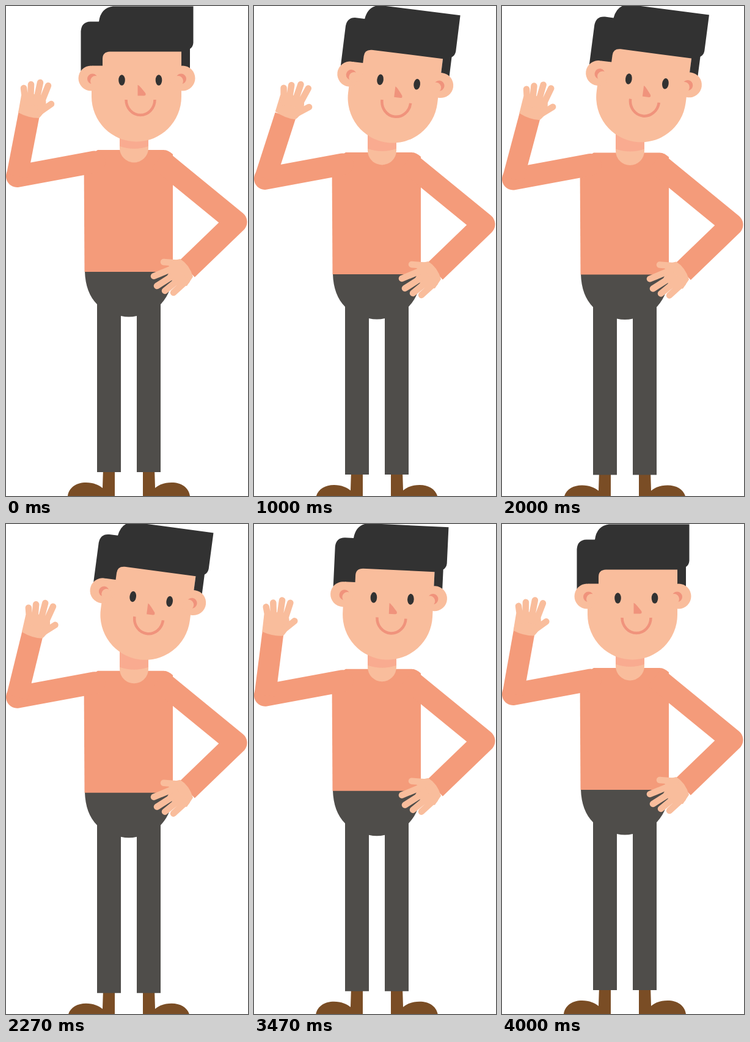
Write an HTML page that moves like this. It is 396 px wide and 800 px high and loops after 4.07 s.

```html
<!DOCTYPE html>
<html lang="en">
<head>
<meta charset="utf-8">
<title>Waving man</title>
<style>
html, body { margin: 0; width: 100%; height: 100%; overflow: hidden; background: #fff; }
svg { display: block; width: 100vw; height: 100vh; }
.skin { fill: #f9bd9c; }
.fingers { fill: none; stroke: #f9bd9c; stroke-width: 10.5; stroke-linecap: round; }
.shirt { fill: #f49b7a; }
.sleeve { fill: none; stroke: #f49b7a; stroke-width: 37; stroke-linejoin: round; }
.pants { fill: #4f4d4a; }
.shoe { fill: #7a4d25; }
.dark { fill: #323232; }
.blush { fill: #f0937c; }
</style>
</head>
<body>
<svg viewBox="0 0 396 800">
  <defs>
    <path id="shoe" class="shoe" d="M101 800C103 786 115 778 131 778C143 778 152 782 158 787L159 755H178V806H100Z"/>
    <g id="ear">
      <circle class="skin" cx="139" cy="118" r="20.5"/>
      <circle class="blush" cx="141.5" cy="119" r="8.5"/>
      <circle class="skin" cx="146.5" cy="122.5" r="8.5"/>
    </g>
  </defs>

  <g id="body">
    <use href="#shoe"/>
    <use href="#shoe" transform="matrix(-1 0 0 1 402 0)"/>
    <path class="pants" d="M129 433H273Q273 466 253 487V761H214V506Q201 509 188 506V761H149V487Q130 468 129 433Z"/>
    <path class="shirt" d="M150 235H258Q265 235 273 242V434H128.5L127.5 250Z"/>
    <path class="sleeve" d="M250 249.7L376 352.5L296 429.5"/>
    <path class="skin" d="M285 413Q300 422 306 442L296 457L280 456L264 440L270 429L262 418Z"/>
    <path class="fingers" d="M258 418L284 420M242 441L276 427M247 457L280 436M260 465L288 442M274 468L296 448"/>
    <path class="sleeve" d="M18 278L145 254.5" stroke-linecap="round" style="stroke-width:36"/>
    <g id="forearm">
      <path class="sleeve" d="M18 278L38.5 172" style="stroke-width:35"/>
      <g id="hand">
        <path class="skin" d="M20 174L25 146Q45 138 65 153Q68 170 54 183Q37 183 20 174Z"/>
        <path class="fingers" d="M29 134L32 158M41 128L40 158M56 125L49 158M69 130L57 160M74 160L54 174"/>
      </g>
    </g>
    <path class="skin" d="M186 200V232A23.5 23.5 0 0 0 233 232V200Z"/>
    <path fill="#f9ab90" d="M186 200H233V229Q210 237 186 229Z"/>
  </g>

  <g id="head">
    <path class="skin" d="M140 72H287V148A73.5 73.5 0 0 1 140 148Z"/>
    <path class="dark" d="M122.500 106V41Q123.500 26 138 25.500H152Q155 3 175 0.500H306.500V60Q306 67 301 70V102H287V74.500H170Q158 75 158 86V97.500H141L136 106Z"/>
    <use href="#ear"/>
    <use href="#ear" transform="matrix(-1 0 0 1 428 0)"/>
    <ellipse class="dark" cx="189.500" cy="121" rx="5.300" ry="8.800"/>
    <ellipse class="dark" cx="250" cy="121" rx="5.300" ry="8.800"/>
    <path class="blush" d="M215.500 129Q217 128 228 142Q230 146 226 146.500H215.500Z"/>
    <path d="M196.500 153A23.500 25 0 0 0 243.500 153" fill="none" stroke="#f0937c" stroke-width="4.500"/>
  </g>
</svg>
<script>
const LOOP = 4070;
// time, body drop, head tilt, head drop, forearm swing
const KEYS = [
  [0, 0, 0, 0, 0],
  [600, 3.9, 7.1, 2.4, 7],
  [1200, 3.9, 7.1, 2.4, 7],
  [2530, 4.8, 7.6, 0.6, 2.4],
  [3070, 4.8, 7.6, 0.6, 2.4],
  [3740, 0, 0, 0, -7],
  [LOOP, 0, 0, 0, 0]
];
const [body, head, forearm, hand] =
  ['body', 'head', 'forearm', 'hand'].map(id => document.getElementById(id));
const ease = u => u * u * (3 - 2 * u);

function poseAt(t) {
  const next = KEYS.findIndex(key => key[0] > t);
  const a = KEYS[next - 1], b = KEYS[next];
  const p = ease((t - a[0]) / (b[0] - a[0]));
  return a.map((v, i) => v + (b[i] - v) * p);
}

function draw(now) {
  const [, drop, tilt, headDrop, swing] = poseAt(now % LOOP);
  const reach = Math.max(0, swing); // the arm stretches as it swings inwards
  body.setAttribute('transform', `translate(0 ${drop})`);
  head.setAttribute('transform', `translate(${tilt * 2.43} ${headDrop}) rotate(${tilt} 214.5 118)`);
  forearm.setAttribute('transform', `rotate(${swing} 18 278)`);
  hand.setAttribute('transform', `translate(${0.19 * reach} ${-0.98 * reach})`);
}

const start = performance.now();
function tick() {
  draw(performance.now() - start);
  requestAnimationFrame(tick);
}
tick();
</script>
</body>
</html>
```
